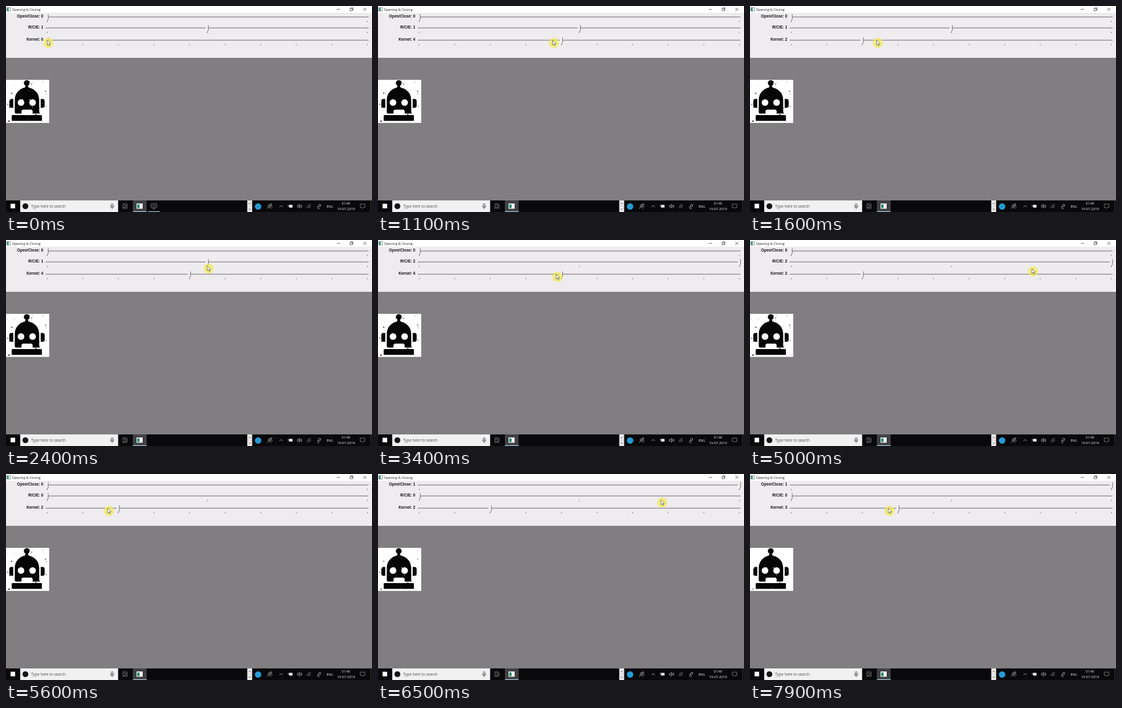
Write an HTML page that moves like this. It is 600x338 px and loops after 8 s.

```html
<!DOCTYPE html>
<html lang="en">
<head>
<meta charset="utf-8">
<title>Opening and closing demo</title>
<style>
html, body { margin: 0; width: 100%; height: 100%; overflow: hidden; background: #807e80; }
svg { display: block; width: 600px; height: 338px; }
text { font-family: "Open Sans", "Noto Sans", sans-serif; }
.label { font: bold 6.4px "Liberation Sans", Arial, sans-serif; text-anchor: end; fill: #111; }
.icon { fill: none; stroke: #d4d4d4; stroke-width: .7; }
.dim { stroke: #959597; }
.tray { fill: #f0f0f0; text-anchor: middle; }
</style>
</head>
<body>
<svg id="stage" viewBox="0 0 600 338" xmlns="http://www.w3.org/2000/svg">
  <rect width="600" height="338" fill="#807e80"/>
  <rect y="11" width="600" height="74" fill="#eeecee"/>
  <rect width="600" height="11" fill="#fff"/>

  <!-- title bar -->
  <rect x="1" y="2.3" width="6.4" height="6.2" fill="#edf4f2" stroke="#607570" stroke-width=".6"/>
  <rect x="1.6" y="3.2" width="2.8" height="4.7" fill="#2c8a6c"/>
  <text x="9.7" y="7.8" font-size="5.47" fill="#222">Opening &amp; Closing</text>
  <g fill="none" stroke="#333" stroke-width=".7">
    <path d="M542.5 5.5h5M585.8 3l5 5m0-5l-5 5"/>
    <path d="M564 4.2h3.7v3.7H564zM565.2 4.2V3h3.7v3.7h-1.2"/>
  </g>

  <g id="sliders"></g>

  <!-- picture: dots lie under the robot, specks over it -->
  <rect y="121.2" width="70.8" height="70.6" fill="#fff"/>
  <g id="dots"></g>
  <g transform="translate(.4 .4)">
    <g fill="#050505">
      <circle cx="33.6" cy="126" r="4.7"/>
      <path d="M31.5 129h4.200v2q.3 2.500 3.300 3.200C47 136.500 54 143 54 154V173.500Q54 176 51.500 176h-35Q14 176 14 173.500V154C14 143 21 136.500 28.200 134.200Q31.200 133.500 31.500 131Z"/>
      <path id="ear" d="M11.500 152v14.500h-3Q5 166.500 5 163v-7.500Q5 152 8.500 152Z"/>
      <use href="#ear" transform="matrix(-1 0 0 1 68 0)"/>
      <rect x="9" y="178.500" width="49.500" height="9.500" rx="1.200"/>
    </g>
    <g fill="#fff">
      <circle cx="24.200" cy="158" r="5.400"/>
      <circle cx="43.200" cy="158" r="5.400"/>
      <path d="M25 176.500v-5l2-2h14.500l1.800 2v5Z"/>
    </g>
  </g>
  <g id="specks" fill="#fff"></g>

  <!-- taskbar -->
  <rect y="319" width="600" height="19" fill="#09090b"/>
  <path d="M598 319v19" stroke="#5a5a5c" stroke-width=".7"/>
  <rect x="7.500" y="324.500" width="7.500" height="7.500" fill="#fff"/>
  <rect x="23.300" y="319" width="160.500" height="19" fill="#f1f1f1"/>
  <circle cx="31.800" cy="328.500" r="4.800" fill="#161616"/>
  <text x="41.300" y="331" font-size="6.200" fill="#4c4c4c">Type here to search</text>
  <g fill="none" stroke="#333" stroke-width=".8">
    <rect x="172.800" y="324.300" width="2.400" height="5" rx="1.200"/>
    <path d="M171.300 327.500v.8a2.700 2.700 0 0 0 5.400 0v-.8M174 331v2"/>
  </g>
  <path class="icon dim" d="M191.500 325v-.6h5v.6M191.500 326.500h5v4h-5zM191.500 332.700v-.6h5v.6M198.500 324.400v8.400"/>
  <rect x="208" y="319" width="22.500" height="19" fill="#414143"/>
  <rect x="208" y="336.800" width="22.500" height="1.200" fill="#a9c9dc"/>
  <rect x="214" y="324" width="10" height="8.600" fill="#f4f7f6"/>
  <rect x="215" y="325.500" width="4" height="6" fill="#2c8a6c"/>
  <g id="task">
    <rect x="233" y="336.800" width="19" height="1.200" fill="#a9c9dc"/>
    <rect x="237.500" y="324" width="10" height="7" rx=".6" fill="#29292c" stroke="#68686c" stroke-width=".7"/>
    <path d="M240 333h5M242.500 331v2" stroke="#77777b" stroke-width=".8"/>
  </g>
  <rect x="395.500" y="319" width="8" height="19" fill="#e9e9e9"/>
  <path d="M395.500 328.500h8" stroke="#b8b8b8" stroke-width=".5"/>
  <path d="M397.700 325l1.800-1.800 1.800 1.800M397.700 332.500l1.800 1.800 1.800-1.800" fill="none" stroke="#444" stroke-width=".8"/>
  <circle cx="413.300" cy="329" r="5.300" fill="#2599d4"/>
  <g class="icon">
    <circle cx="431.500" cy="327.500" r="1.600"/>
    <path d="M428.700 332.500q.3-3 2.800-3t2.800 3"/>
    <circle cx="434.500" cy="325.800" r="1.300"/>
    <path d="M434.300 328q1.800 0 2 2.300M448.300 330l2.800-2.800 2.800 2.800M462.800 326v3.500"/>
    <path d="M477.800 327.200h1.500l2-1.800v6.200l-2-1.800h-1.500zM482.700 327q1 1.500 0 3M484.200 325.800q1.800 2.700 0 5.400"/>
    <path d="M510 331.500q2.500-4 3.500-2t2.500-3.500l-2.500-.5-2.500 5M511 332.500h3"/>
    <path class="dim" d="M580.800 325h7.500v5.500h-2.300l-1.500 1.800-1.500-1.800h-2.200z"/>
    <path class="dim" d="M493.500 331.500a6 6 0 0 1 6-6M495.500 331.500a4 4 0 0 1 4-4M497.500 331.500a2 2 0 0 1 2-2"/>
  </g>
  <path d="M464 326.300h5.700v4.400H464z" fill="#efefef"/>
  <g class="tray">
    <text x="530.800" y="330.600" font-size="5.300">ENG</text>
    <text x="557.200" y="326.400" font-size="5.300">01:49</text>
    <text x="557.500" y="335.400" font-size="5.650">19-07-2019</text>
  </g>

  <circle id="press" cx="299.300" cy="56" r="2.400" fill="#dcdadc" stroke="#777" stroke-width=".8"/>
  <g id="cursor">
    <circle cx="2" cy="4.500" r="8.300" fill="#f3ec55" opacity=".72"/>
    <path d="M0 0V7.900L1.900 6.200 3.200 9.100 4.500 8.500 3.200 5.800H5.700Z" fill="#fff" stroke="#333" stroke-width=".6"/>
  </g>
</svg>
<script>
const LOOP = 8000, LEFT = 67.5, SPAN = 525;
const $ = id => document.getElementById(id);

// grip: height of the pointer's tip below the track
const mode = { name: "Open/Close", y: 18, grip: 4, max: 1, start: 0 };
const shape = { name: "R/C/E", y: 36, grip: 6.5, max: 2, start: 1 };
const kernel = { name: "Kernel", y: 56.1, grip: 0, max: 9, start: 0 };
const sliders = [mode, shape, kernel];

// The pointer travels between places on the tracks; a drag takes the thumb along.
const stops = [];
const move = (time, slider, value, drag = false) => stops.push({ time, slider, value, drag });
const drag = (time, slider, value) => move(time, slider, value, true);

move(0, kernel, 0);
move(300, kernel, 0);
drag(1100, kernel, 3.75);
drag(1600, kernel, 2.4);
drag(1900, kernel, 4.25);
move(2100, kernel, 3);
move(2400, shape, 1);
move(2600, shape, 1);
drag(3100, shape, 1.78);
move(3400, kernel, 3.85);
move(3600, mode, .87);
move(4100, kernel, 4);
drag(4500, kernel, 2);
move(4600, mode, .52);
move(4800, kernel, 2.3);
move(5100, shape, 2);
drag(5500, shape, 0);
move(5600, kernel, 1.7);
move(6100, mode, 0);
drag(6400, mode, .75);
move(6500, shape, 1.51);
move(6900, mode, 0);
move(7300, kernel, 2.2);
move(7600, kernel, 2);
drag(7900, kernel, 2.73);

const mix = (a, b, f) => a + (b - a) * f;
const trackX = (s, v) => LEFT + SPAN * v / s.max;

function snap(t) {
  if (t < 300) return t < 100 ? 0 : 100;
  const u = t - 300;
  return 300 + Math.floor(u / 500) * 500 + Math.min(3, Math.floor(u % 500 / 100)) * 100;
}

function pose(t) {
  const values = new Map(sliders.map(s => [s, s.start]));
  let x, y;
  for (const stop of stops) {
    const before = stops[stops.indexOf(stop) - 1] || stop;
    if (before.time > t) break;
    const f = Math.min(1, (t - before.time) / (stop.time - before.time || 1));
    const { slider, value } = stop;
    x = mix(trackX(before.slider, before.value), trackX(slider, value), f);
    y = mix(before.slider.y + before.slider.grip, slider.y + slider.grip, f);
    if (stop.drag) values.set(slider, Math.round(mix(before.value, value, f)));
  }
  return { x, y, values };
}

function drawSlider(s, value) {
  const x = trackX(s, value), y = s.y;
  let ticks = "";
  for (let v = 0; v <= s.max; v++) ticks += `M${trackX(s, v)} ${y + 6.6}v1.6`;
  return `<text class="label" x="61" y="${y + 1.3}">${s.name}: ${value}</text>
    <path d="M65 ${y}H594.5" stroke="#6d6b6d"/>
    <path d="${ticks}" stroke="#555" stroke-width=".9"/>
    <path d="M${x - 2.7} ${y - 4.5}h4.4v8.5l-2.2 3-2.2-3z" fill="#f1eff1"/>
    <path d="M${x + 1.7} ${y - 4.5}v8.5l-2.2 3" fill="none" stroke="#666" stroke-width=".9"/>`;
}

function scatter(count, seed, size) {
  const random = () => (seed = seed * 16807 % 2147483647) / 2147483647;
  return Array.from({ length: count }, () => ({
    x: 1.5 + 68 * random(), y: 123 + 67 * random(), r: .35 + size * random() ** 2
  }));
}
const dots = scatter(44, 7919, .85);
const specks = scatter(32, 48271, .6);
const circles = list => list.map(({ x, y, r }) => `<circle cx="${x}" cy="${y}" r="${r}"/>`).join("");

function render(time) {
  const t = snap(time % LOOP);
  const { x, y, values } = pose(t);
  const closing = values.get(mode) === 1, size = values.get(kernel);
  $("sliders").innerHTML = sliders.map(s => drawSlider(s, values.get(s))).join("");

  // opening fills the white specks, closing removes the smaller black dots
  const limit = closing ? .3 + .25 * size : 0;
  $("dots").innerHTML = circles(dots.filter(d => d.r > limit));
  $("dots").setAttribute("opacity", closing ? 1.1 - .2 * size : 1);
  $("specks").innerHTML = closing || !size ? circles(specks) : "";

  $("task").style.display = t < 100 ? "" : "none";
  $("press").style.display = t >= 4100 && t < 4500 ? "" : "none";
  $("cursor").setAttribute("transform", `translate(${x} ${y})`);
}

const begin = performance.now();
function tick() {
  render(performance.now() - begin);
  requestAnimationFrame(tick);
}
tick();
</script>
</body>
</html>
```
